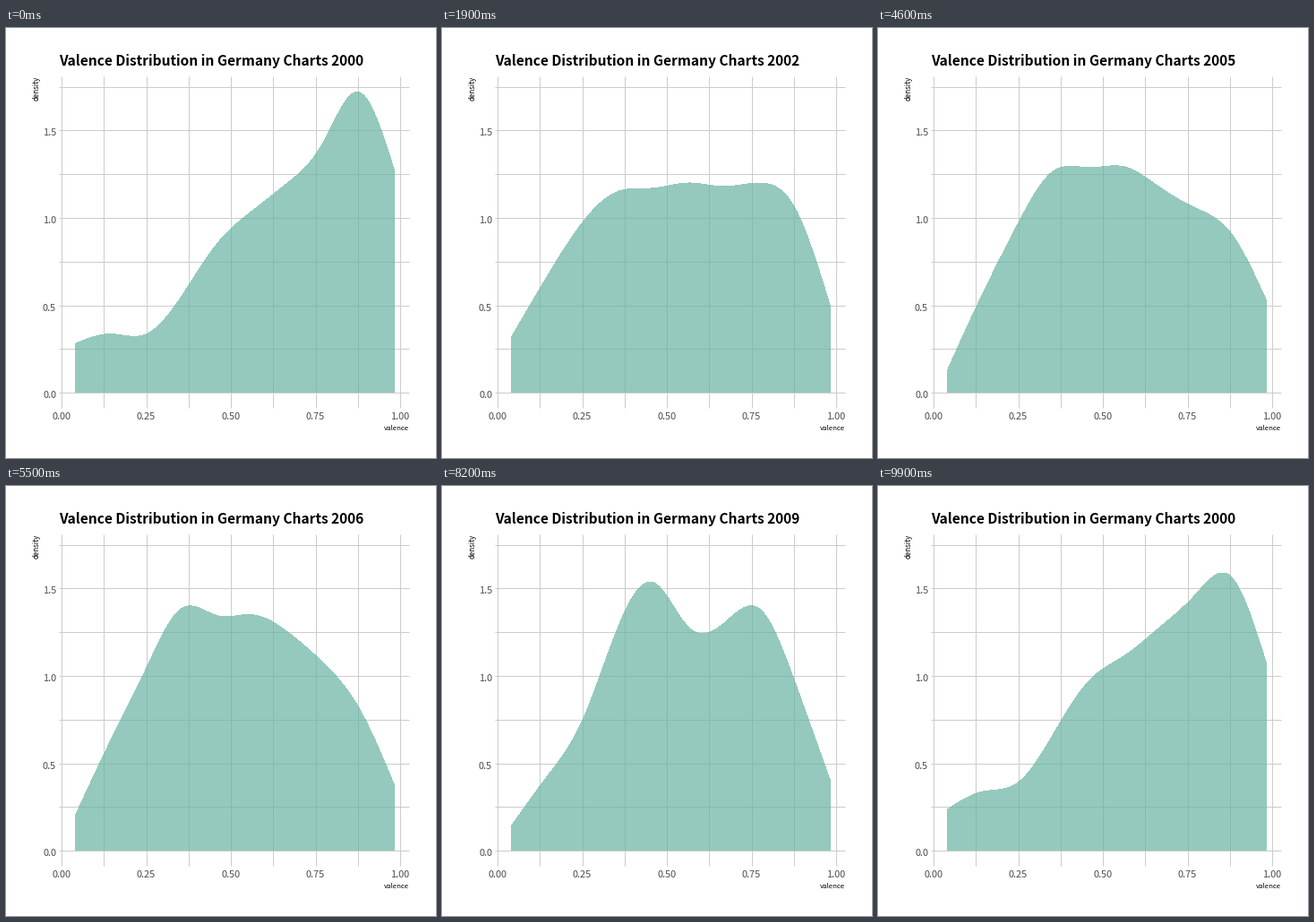
A matplotlib script for the animation above (10 s loop, 480x480 px).

```python
import numpy as np
import matplotlib.pyplot as plt
from matplotlib.animation import FuncAnimation

SIZE, DPI = 480, 100
PX = 72 / DPI
YEARS = 11
plt.rcParams["font.family"] = ["Noto Sans CJK JP", "Liberation Sans"]

KNOTS = np.linspace(.04, .981, 10)
X = np.linspace(KNOTS[0], KNOTS[-1], 400)

# Density at evenly spaced key points; the other years lie between neighbours
KEY_YEARS = {
    2000: [.28, .335, .334, .55, .85, 1.04, 1.2, 1.43, 1.72, 1.28],
    2002: [.315, .66, .97, 1.15, 1.17, 1.2, 1.18, 1.2, 1.06, .5],
    2004: [.29, .605, .92, 1.15, 1.23, 1.235, 1.1, 1.04, 1.01, .685],
    2006: [.2, .63, 1.04, 1.385, 1.345, 1.35, 1.25, 1.075, .82, .38],
    2008: [.245, .61, 1.07, 1.335, 1.26, 1.07, 1.015, 1.085, .97, .63],
    2009: [.14, .42, .74, 1.27, 1.535, 1.28, 1.3, 1.385, .97, .405],
    2010: [.1, .345, .555, 1.02, 1.33, 1.34, 1.51, 1.56, 1.12, .48],
}


def spline(values):
    """Natural cubic spline through evenly spaced knots, sampled at X."""
    v = np.asarray(values)
    n = len(v)
    system, rhs = np.eye(n), np.zeros(n)
    for i in range(1, n - 1):
        system[i, i - 1:i + 2] = 1, 4, 1
        rhs[i] = v[i - 1] - 2 * v[i] + v[i + 1]
    m = np.linalg.solve(system, rhs)
    u = (X - KNOTS[0]) / (KNOTS[1] - KNOTS[0])
    i = np.clip(u.astype(int), 0, n - 2)
    b = u - i
    a = 1 - b
    return (a * v[i] + b * v[i + 1]
            + (a**3 - a) * m[i] + (b**3 - b) * m[i + 1])


curves = {year: spline(values) for year, values in KEY_YEARS.items()}
left_tail = .12 * np.clip((.35 - X) / .31, 0, 1) ** 2
for year in range(2001, 2008, 2):
    curves[year] = (curves[year - 1] + curves[year + 1]) / 2 - left_tail


def px(v):
    return 62.2 + 378 * v


def py(v):
    return 407 - 195 * v


def state(frame):
    """Year in the title and the linearly blended density."""
    starts = [5 + 9 * k + min(k, 2) for k in range(YEARS)]
    k = sum(frame >= s for s in starts) - 1
    if k < 0:
        return 2000, curves[2000]
    steps = 5 if k < 2 else 4
    t = min(1, (frame - starts[k] + 1) / steps)
    old, new = 2000 + k, 2000 + (k + 1) % YEARS
    return (new if t >= .5 else old), (1 - t) * curves[old] + t * curves[new]


fig = plt.figure(figsize=(SIZE / DPI, SIZE / DPI), dpi=DPI, facecolor="white")
ax = fig.add_axes([0, 0, 1, 1])
ax.set(xlim=(0, SIZE), ylim=(SIZE, 0))
ax.axis("off")

grid = dict(color="#cccccc", lw=PX, solid_capstyle="butt", zorder=1)
for v in np.arange(9) / 8:
    ax.plot([np.round(px(v))] * 2, [54, 424], **grid)
for v in np.arange(8) / 4:
    ax.plot([59, 450], [np.round(py(v))] * 2, **grid)


def label(x, y, text, size, color="black", **kw):
    return ax.text(x, y, text, fontsize=size * PX, color=color,
                   va="baseline", **kw)


for v in np.arange(5) / 4:
    label(px(v) - .5, 437, f"{v:.2f}", 11, "#4d4d4d", ha="center")
for v in np.arange(4) / 2:
    label(56, py(v) + 6, f"{v:.1f}", 11, "#4d4d4d", ha="right")
label(450, 449, "valence", 7.8, ha="right")
label(37, 54, "density", 8, ha="right", rotation=90, rotation_mode="anchor")
title = label(59, 42, "", 15.5, weight="bold")

area, = ax.fill([0], [0], color="#69b3a2", alpha=.7, lw=0,
                antialiased=False, zorder=2)


def update(frame):
    year, density = state(frame)
    title.set_text(f"Valence Distribution in Germany Charts {year}")
    x = px(np.r_[X[0], X, X[-1]])
    y = py(np.r_[0, density, 0])
    area.set_xy(np.column_stack([x, y]))
    return area, title


anim = FuncAnimation(fig, update, frames=100, interval=100, repeat=True,
                     repeat_delay=0, blit=False)
plt.show()
```
